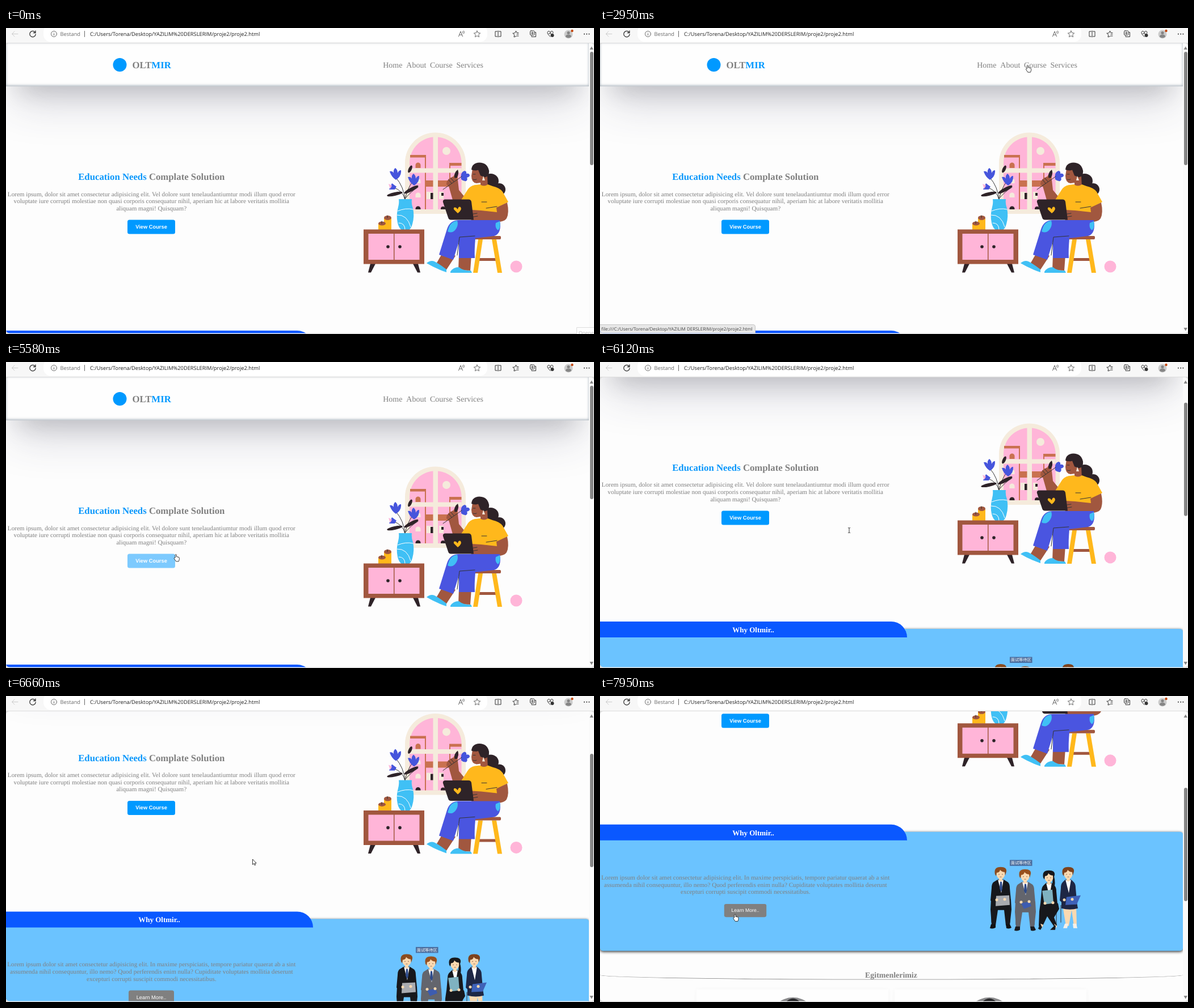
These frames come from a looping animation (1036 px wide and 540 px high, 8000 ms). An HTML page:

```html
<!DOCTYPE html>
<html lang="en">
<head>
<meta charset="utf-8">
<title>Course page</title>
<style>
html, body { margin: 0; width: 100%; height: 100%; overflow: hidden; background: #dedede; }
#stage, #stage svg, #page { position: absolute; left: 0; top: 0; width: 1036px; height: 540px; }
#stage { overflow: hidden; }
#page { clip-path: inset(27px 0 1.5px 0 round 6px); background: #fdfdfd; }
#doc, #doc div { position: absolute; }
#doc { left: 0; top: 0; width: 1027px; }
#doc svg { overflow: visible; }
text { font-family: "Liberation Serif", serif; text-rendering: geometricPrecision; }
.ui { font-family: "Open Sans", "Noto Sans", sans-serif; }
.btn { font-family: "Liberation Sans", sans-serif; font-size: 9.3px; fill: #fff; }
.b { font-weight: bold; }
.mid { text-anchor: middle; }
.p { font-size: 11.15px; fill: gray; text-anchor: middle; }
.line { fill: none; stroke: #333; stroke-width: 1; stroke-linecap: round; stroke-linejoin: round; }
#head { left: 0; top: 27px; width: 1027px; height: 76px; background: #fefefe;
  box-shadow: 0 38px 77px -15px rgba(50,50,93,.25), 0 23px 46px -23px rgba(0,0,0,.3), inset 0 -1.5px 4.6px rgba(10,37,64,.35); }
#why { left: 0; top: 547px; width: 1027px; height: 210px; border-radius: 5px; background: #6bc3ff; box-shadow: 0 1.5px 5px rgba(0,0,0,.85); }
#tab { left: 0; top: 533.7px; width: 541px; height: 28.8px; background: #0a58ff; border-top-right-radius: 28.8px; }
#arc { left: 0; top: 791px; width: 1027px; height: 16px; border-bottom: 1px solid gray; border-radius: 50%; }
.card { top: 825px; width: 338px; height: 200px; background: #fefefe; box-shadow: 0 0 8px rgba(0,0,0,.04); }
</style>
</head>
<body>
<div id="stage">
<div id="page">
  <div id="doc">
    <div id="head"></div><div id="why"></div><div id="tab"></div><div id="arc"></div>
    <div class="card" style="left:170px"></div><div class="card" style="left:519px"></div>
    <svg>
      <circle cx="200.500" cy="65" r="12" fill="#09f"/>
      <text class="b" x="222.500" y="71" font-size="16.750" fill="gray">OLT<tspan fill="#09f">MIR</tspan></text>
      <g id="nav" font-size="14"></g>
      <text class="b mid" x="256.300" y="268.200" font-size="16.750" fill="gray"><tspan fill="#0a97fb">Education Needs</tspan> Complate Solution</text>
      <text class="p" x="256.300" y="296.500">Lorem ipsum, dolor sit amet consectetur adipisicing elit. Vel dolore sunt tenelaudantiumtur modi illum quod error</text>
      <text class="p" x="256.300" y="309.300">voluptate iure corrupti molestiae non quasi corporis consequatur nihil, aperiam hic at labore veritatis mollitia</text>
      <text class="p" x="256.300" y="322.100">aliquam magni! Quisquam?</text>
      <g id="view"><rect x="214" y="338.500" width="84" height="25" rx="3.500" fill="#09f"/><text class="btn b mid" x="256" y="354">View Course</text></g>

      <g>
        <!-- window -->
        <path fill="#f5ebdc" d="M703 328V238a53.500 53.500 0 01107 0V328z"/>
        <path fill="#ffb5d8" d="M711 320V238a45.800 45.800 0 0191.600 0V320z"/>
        <circle cx="776" cy="217" r="7" fill="#f5ebdc"/>
        <path fill="#c9714f" d="M712 224h28v4.500h-28zM738 228h2v92h-2zM781 238h21.500v5H781zM781 243h2v26h-2zM740 269h50v11h-50zM721.500 247v-5a4.500 4.500 0 019 0v5zM788 269v-6a4 4 0 018 0v6z"/>
        <path fill="#f5ebdc" d="M721.500 274v-4a4.500 4.500 0 019 0v4zM721.500 299v-4a4.500 4.500 0 019 0v4zM741 289h9v13h-9zM763 289h8v13h-8z"/>
        <path fill="#2e2328" d="M748 291h6v11h-6zM767 291h4v5h-4zM721.500 320v-1a4.500 4.500 0 019 0v1zM766 320v-1a4 4 0 018 0v1z"/>
        <path fill="#f5ebdc" d="M752.500 192h8.500v128h-8.500zM711 247.500h91.500v8H711z"/>
        <!-- plant and vase -->
        <path class="line" d="M703 303Q701 280 687 264M703 303Q706 285 717 270M703 303Q700 287 682 281M704 300Q714 288 726 281"/>
        <g fill="#2e2328">
          <ellipse cx="712" cy="249" rx="2.800" ry="7" transform="rotate(25 712 249)"/>
          <ellipse cx="685" cy="293" rx="14" ry="3" transform="rotate(-12 685 293)"/>
          <ellipse cx="714" cy="285" rx="14" ry="3.200" transform="rotate(-28 714 285)"/>
        </g>
        <g fill="#4655dc">
          <path id="bloom" d="M687 268q-8-5-11-15 5-1 7 3-1-6 3-9 4 3 4 9 2-5 6-5 1 11-9 17z"/>
          <use href="#bloom" transform="translate(32 10)"/>
          <path d="M802 267q-2-13 6-15 4 1 3 5 6-1 6 4-2 3-5 3 2 3-1 6-5 1-9-3zM675 285l5-11 8 6-3 5z"/>
        </g>
        <path fill="#ffb5d8" d="M674 275l6 3-3 6z"/>
        <path fill="#40c0f5" d="M692 302h23q-1 8 2 16 3 14-1 28-2 8-7 11h-11q-6-4-8-13-3-14 1-28 2-8 1-14z"/>
        <path class="line" style="stroke:#fff" d="M690 323q14-6 27-3M689 330q18-1 24 21M692 344q11 0 11 12"/>
        <!-- cabinet and candles -->
        <path fill="#ffb81c" d="M656 345h13v11h-13zM666 335h13v21h-13z"/>
        <g fill="#a1573f"><ellipse cx="662.500" cy="345" rx="6.500" ry="3.500"/><ellipse cx="672.500" cy="335" rx="6.500" ry="4"/></g>
        <path class="line" d="M662 345v-4M672 335v-4"/>
        <path fill="#2e2328" d="M642 416h9l-8 15.500h-5zM717 416h9l4 15.500h-5z"/>
        <path fill="#a1573f" d="M630 355.500h107V416.500H630z"/>
        <path fill="#ffb5d8" d="M638.500 363h44.500v46h-44.500zM684.500 363h44v46h-44z"/>
        <g fill="#2e2328"><circle cx="673" cy="386" r="2.800"/><circle cx="694" cy="386" r="2.800"/></g>
        <!-- stool and ball -->
        <path fill="#a1573f" d="M830 406h37v5h-37z"/>
        <path fill="#ffb81c" d="M832 373h8l-9 59h-8zM856 373h8l10 59h-8z"/>
        <rect x="824" y="367" width="48" height="6" rx="2" fill="#a1573f"/>
        <circle cx="899" cy="421" r="10.500" fill="#ffb5d8"/>
        <!-- woman -->
        <g fill="#2e2328"><ellipse cx="854" cy="270" rx="14" ry="13"/><ellipse cx="869" cy="285" rx="11" ry="11"/></g>
        <path fill="#a1573f" d="M822 248l-2 13q0 12 9 13l7-1v8q5 6 13 0l-1-20q-3-18-18-17z"/>
        <path fill="#2e2328" d="M820 250q1-12 14-12.500 14 0 17 14 1 10-7 12l-8-3-4-10q-6 2-12-.500z"/>
        <path class="line" d="M823 258h4M823 267q3 2 6 0"/>
        <path fill="#f5ebdc" d="M841 261l3 8h-5z"/>
        <path fill="#a1573f" d="M776 276q0-7 6-11l6-3 8 6 2 18 10 12-3 12-17-3-8-28z"/>
        <path class="line" d="M770 285l33-23M780 268l5 6M784 265l5 6"/>
        <path fill="#2e2328" d="M790 264q-1-9 6-14 3 8-2 15z"/>
        <path fill="#ffb81c" d="M801 305l12-19q4-7 13-9l9-1q7 5 14 0l8 3q13 3 18 10l10 18-19 10 1 22-47 1-2-28-10-3z"/>
        <path class="line" d="M838 307h9M846 318l19-3"/>
        <path fill="#a1573f" d="M864 317l19-9q4 18-1 28-4 6-16 6l-44-2q-5-2-6-10l5-9 16 1 28 3z"/>
        <path class="line" d="M817 329l13-2M819 334l12-2"/>
        <path fill="#a1573f" d="M772 392l20 10-17 26-20-7zM798 400h22l-2 28-21-1z"/>
        <path fill="#4a55e0" d="M798 339h72q4 24-10 28l-33 4q-2 22-1 35h-28v-29l-10 32-25-9 14-45q5-16 21-16z"/>
        <path class="line" d="M826 367l-27 2-4 32"/>
        <path fill="#40c0f5" d="M780 353q3-11 15-13 3 9-4 17-6 6-13 2zM870 341q2 11-3 16-6-4-4-13zM755 412q8 4 21 14v5q-18-6-35-16 7-6 14-3zM783 430q5-8 15-8 8 7 21 6l2 4h-38z"/>
        <path fill="#2e2328" d="M773 302.500h42q4 0 5 4l4 32h-40q-4 0-5-4l-9-27q-1-4 3-5z"/>
        <path fill="#ffb81c" d="M796 327l-7-7q-1-5 4-3l3 3q1-6 5-4 3 5-5 11z"/>
      </g>

      <text class="b mid" x="270" y="553" font-size="13" fill="#fff">Why Oltmir..</text>
      <text class="p" x="256.300" y="631">Lorem ipsum dolor sit amet consectetur adipisicing elit. In maxime perspiciatis, tempore pariatur quaerat ab a sint</text>
      <text class="p" x="256.300" y="643.800">assumenda nihil consequuntur, illo nemo? Quod perferendis enim nulla? Cupiditate voluptates mollitia deserunt</text>
      <text class="p" x="256.300" y="656.600">excepturi corrupti suscipit commodi necessitatibus.</text>
      <g id="learn"><rect x="-40" y="-12.500" width="80" height="25" rx="3.500" fill="gray"/><text class="btn mid" y="3">Learn More..</text></g>
      <g transform="translate(0 230)">
        <rect x="722" y="366.500" width="39.500" height="10.500" fill="#4a6d9e"/>
        <text class="mid" x="741.700" y="374.500" font-size="7.200" fill="#fff" style="font-family:'Noto Sans CJK SC','Noto Sans CJK',sans-serif">面试等待区</text>
        <g id="team"></g>
      </g>
      <text class="b mid" x="513" y="804" font-size="13.900" fill="gray">Egitmenlerimiz</text>
      <g id="photo"><circle cx="340" cy="880" r="41" fill="#8b8b8d"/><ellipse cx="340" cy="862" rx="17" ry="21" fill="#29292b"/></g>
      <use href="#photo" x="346"/>
    </svg>
  </div>
  <svg>
    <path fill="#fafafa" d="M1027 27h9v512h-9z"/>
    <path fill="#858585" d="M1028.500 38l3.200-5.500 3.200 5.500zM1028.500 529l3.200 5.500 3.200-5.500z"/>
    <rect id="thumb" x="1029" width="6" height="200" rx="3" fill="#858585"/>
    <g id="status">
      <path fill="#e8e8e8" stroke="#c6c6c6" d="M-1 523.500H270q3.500 0 3.500 3.500V540H-1z"/>
      <text class="ui" x="2.500" y="534" font-size="8" fill="#444">file:///C:/Users/Torena/Desktop/YAZILIM DERSLERIM/proje2/proje2.html</text>
    </g>
  </svg>
</div>

<svg>
  <path fill="#f7f7f7" d="M0 0h1036v26H0z"/>
  <rect x="66" y="-6" width="782" height="30.500" rx="13" fill="#fff"/>
  <path class="line" style="stroke:#ccc" d="M21 10.500H10.500M15 6l-4.500 4.500L15 15"/>
  <path class="line" style="stroke-width:1.300" d="M51.500 8a5.200 5.200 0 10.700 3M52 5v3.500h-3.500"/>
  <g class="line" style="stroke:#666"><circle cx="84.500" cy="10.500" r="5"/><path d="M84.500 10v3M84.500 8v.100M138.500 5.500v10"/></g>
  <text class="ui" x="95.500" y="14" font-size="9.300" fill="#6a6a6a">Bestand</text>
  <text class="ui" x="148" y="14" font-size="9.300" fill="#222">C:/Users/Torena/Desktop/YAZILIM%20DERSLERIM/proje2/proje2.html</text>
  <g class="line" style="stroke:#666">
    <path d="M797.500 15l3.500-9 3.500 9M798.700 12h4.600M804.500 6q1.500 1.500 0 3M806.500 5q2.300 2.500 0 5"/>
    <path d="M830 5l1.700 3.600 4 .500-3 2.700.800 4-3.500-2-3.500 2 .800-4-3-2.700 4-.500z"/>
  </g>
  <g class="line">
    <path d="M865.500 6H862v9h3.500M868.500 6h3.500v9h-3.500M867 5v11"/>
    <path d="M899 14.500l-4 1.500.800-4-3-2.700 4-.500L898.500 5l1.500 3.500h3M900 11h3M900 14h3"/>
    <rect x="923.500" y="5" width="7.500" height="7.500" rx="1.500"/><path d="M932 7.500h1.500v8h-7.500V14M927.300 7v4M925.300 9h4"/>
    <path d="M959 15.500l-4.500-5q-1.500-4 1.500-5 2 0 3 2 1-2 3-2 3 1 1.500 4M956 10h2l1-2 1.500 3"/>
  </g>
  <circle cx="962.500" cy="13" r="3" fill="#333"/>
  <circle cx="991" cy="11" r="7.500" fill="#cbcbcb"/>
  <path fill="#858585" d="M986 15.500q0-4 5-4t5 4q-5 4-10 0z"/><circle cx="991" cy="8.500" r="2.600" fill="#858585"/>
  <circle cx="997.500" cy="5" r="2.200" fill="#c4470c"/>
  <path fill="#333" d="M1018 9.700h1.800v1.800H1018zM1022.300 9.700h1.800v1.800h-1.800zM1026.500 9.700h1.800v1.800h-1.800z"/>
  <g id="tip"><path fill="#fdfdfd" stroke="#ddd" d="M1005.500 528.500H1037V541h-31.500z"/><text class="ui" x="1009" y="541" font-size="8.500" fill="#bbb">Openen</text></g>
  <g id="cursor" fill="#fff" stroke="#222" stroke-width=".9" stroke-linejoin="round">
    <path d="M0 0V9.500L2.200 7.500 3.700 10.800 5.200 10.100 3.800 7H6.700z"/>
    <path d="M-1.200 6V.9q1.200-1.700 2.300 0V4.300L4.600 5Q6 5.300 6 7v2q-.4 2-1.200 3.600H.2Q-2 9.500-3.200 7.200q0-1.400 2-1.200z"/>
    <path fill="none" d="M-2-4.500Q0-4.500 0-3.500Q0-4.500 2-4.500M0-3.500V3.500M-2 4.500Q0 4.500 0 3.500Q0 4.500 2 4.500"/>
  </g>
</svg>
</div>
<script>
const $ = id => document.getElementById(id);
const ARROW = 0, HAND = 1, BEAM = 2;

// time, x, y, shape
const moves = [
  [500, 944, 528, ARROW], [850, 600, 360, ARROW], [1000, 481, 275, ARROW], [1250, 553, 117, ARROW],
  [1460, 597.5, 65.5, ARROW], [1800, 664, 56, HAND], [2140, 688, 63, HAND], [2400, 706, 66, HAND],
  [2880, 734, 65, HAND], [2950, 753.5, 65.5, HAND], [3300, 794, 66, HAND], [3500, 812, 74, ARROW],
  [3710, 756, 96, ARROW], [4200, 417, 235, ARROW], [4550, 290, 297, ARROW], [4700, 270, 340, HAND],
  [4950, 215, 350, HAND], [5110, 231, 347, HAND], [5250, 231, 347, HAND], [5320, 271, 350, HAND],
  [5570, 271, 350, HAND], [5580, 299, 339.5, HAND], [5640, 320, 328, ARROW], [6050, 439, 297, BEAM],
  [6500, 439, 297, BEAM], [6620, 434.5, 288, ARROW], [7260, 434.5, 288, ARROW], [7500, 343, 305, ARROW],
  [7780, 252, 368, HAND], [7950, 238, 385, HAND], [8000, 238, 385, HAND]
];
// each wheel notch scrolls 76.8
const scrolls = [
  [0, 0], [5780, 0], [5850, 12], [6000, 66], [6130, 76.8], [6270, 76.8], [6380, 125], [6450, 143], [6560, 153.6],
  [6680, 153.6], [6760, 170], [6900, 217], [7070, 230.4], [7260, 230.4], [7340, 244], [7480, 293], [7640, 307.2], [8000, 307.2]
];
const links = [
  ["Home", 664.2, 1830, 2390], ["About", 705.3, 2390, 2950],
  ["Course", 747, 2950, 3280], ["Services", 793.5, 3280, 3500]
];

const clamp = v => Math.max(0, Math.min(1, v));
const ramp = (t, from, to, ms) => t >= from && t < to ? clamp((t - from) / ms) : 0;
function track(keys, t, i) {
  const n = Math.max(1, keys.findIndex(k => k[0] > t)), a = keys[n - 1], b = keys[n];
  return a[i] + (b[i] - a[i]) * clamp((t - a[0]) / (b[0] - a[0]));
}
const show = (el, on) => el.style.display = on ? "" : "none";

$("nav").innerHTML = links.map(([word, x]) => `<text x="${x}" y="70">${word}</text>`).join("");

// a seated figure, placed by the centre of the head
const shape = (fill, d) => `<path fill="${fill}" d="${d}"/>`;
const SKIN = "#fbd9b0", BLACK = "#17181c", GREY = "#63656d", NAVY = "#1e2745";
const TROUSERS = "M-17 45h35l1 18-3 28h-7L6 64H-5l-4 27h-7l-2-28z";
const SHOES = "M-17 89h8v6q-5 3-10 1zM9 89h7l3 6q-4 3-9 1z";
const HEELS = "M-6 88h6l-2 8h-7zM8 88h6l2 8H9z";

function sitter(x, y, suit, hair, lower, paper, female) {
  const w = female ? 13 : 16;
  return `<g transform="translate(${x} ${y})">
    <path d="M${-w} 55V86M${w} 55V86" stroke="#333"/>
    ${lower}
    ${shape(suit, `M-5 10H5L${w - 3} 15q3 3 3 10l2 22-5 5H${3 - w}l-5-5L${-w} 25q0-7 3-10z`)}
    ${shape(SKIN, "M-3 6h6v7l-3 3-3-3z")}
    ${shape("#fff", "M-5 10l5 4 5-4L1 34z")}
    ${female ? "" : shape("#2d4a8a", "M-1 14h3l1 12-2 6-3-6z")}
    <ellipse rx="7.500" ry="9" fill="${SKIN}"/>
    ${shape(hair, "M-8 4l-2-3Q-13-12 0-12q11 0 10 8L8 3 7-3Q2-3-1-7q-1 5-6 5z")}
    <path d="M-4 1h2M2 1h2M-1.500 5.500h3" stroke="#754" stroke-width=".8"/>
    ${paper}
    <circle cx="-7" cy="46" r="2.500" fill="${SKIN}"/><circle cx="7" cy="45" r="2.500" fill="${SKIN}"/></g>`;
}
$("team").innerHTML =
  sitter(706, 391, BLACK, "#8a4b1f", shape(BLACK, TROUSERS) + shape("#111", SHOES), shape("#a9abb0", "M-8 39l23-1 1 17-25 2z")) +
  sitter(749, 395, GREY, "#96501f", shape(GREY, TROUSERS) + shape("#1b1b1f", SHOES), shape("#3d5cb0", "M-7 48l15-3 3 8-13 5z")) +
  sitter(791, 397, BLACK, BLACK,
    shape(BLACK, "M7-6q5 10 3 22l-4-3zM-15 46h31l2 10-9 15 5 14-5 2-12-18-9 19-6-2 1-26z") +
    shape(SKIN, "M-15 82l5 2-2 5zM9 82l5 4-1 4z") + shape(BLACK, "M-17 85l5 3-3 5-4-2zM8 87l4-2-1 8H2z"),
    shape("#7fb2c0", "M-12 24l18-2 2 24-16 2z"), true) +
  sitter(825, 391, NAVY, "#7d421d",
    shape(SKIN, "M-10 56h24l1 36h-5l-4-28-5 28h-5z") + shape("#f3f0ea", HEELS) + shape(NAVY, "M-12 44h26l3 17q-14 4-29 0z"),
    shape("#3f62b8", "M-3 41l25-3-7 16-20 1z"), true);

function frame(now) {
  const t = now % 8000, s = track(scrolls, t, 1);
  $("doc").style.transform = `translateY(${-s}px)`;
  $("thumb").setAttribute("y", 42 + s * .391);
  show($("tip"), t < 70);
  show($("status"), t >= 2170 && t < 4300);

  links.forEach(([, , from, to], i) => {
    const p = ramp(t, from, to, 400), mix = (a, b) => a + (b - a) * p;
    $("nav").children[i].setAttribute("fill", `rgb(${mix(128, 0)},${mix(128, 153)},${mix(128, 255)})`);
  });
  $("view").setAttribute("opacity", 1 - .5 * ramp(t, 4690, 5620, 400));
  $("learn").setAttribute("transform", `translate(256 685.7) scale(${1 - .07 * ramp(t, 7790, 8000, 150)})`);

  const c = $("cursor"), key = moves.filter(k => k[0] <= t).pop();
  show(c, key);
  if (key) {
    c.setAttribute("transform", `translate(${track(moves, t, 1)} ${track(moves, t, 2)})`);
    [...c.children].forEach((el, i) => show(el, i === key[3]));
  }
  requestAnimationFrame(frame);
}
requestAnimationFrame(frame);
</script>
</body>
</html>
```
